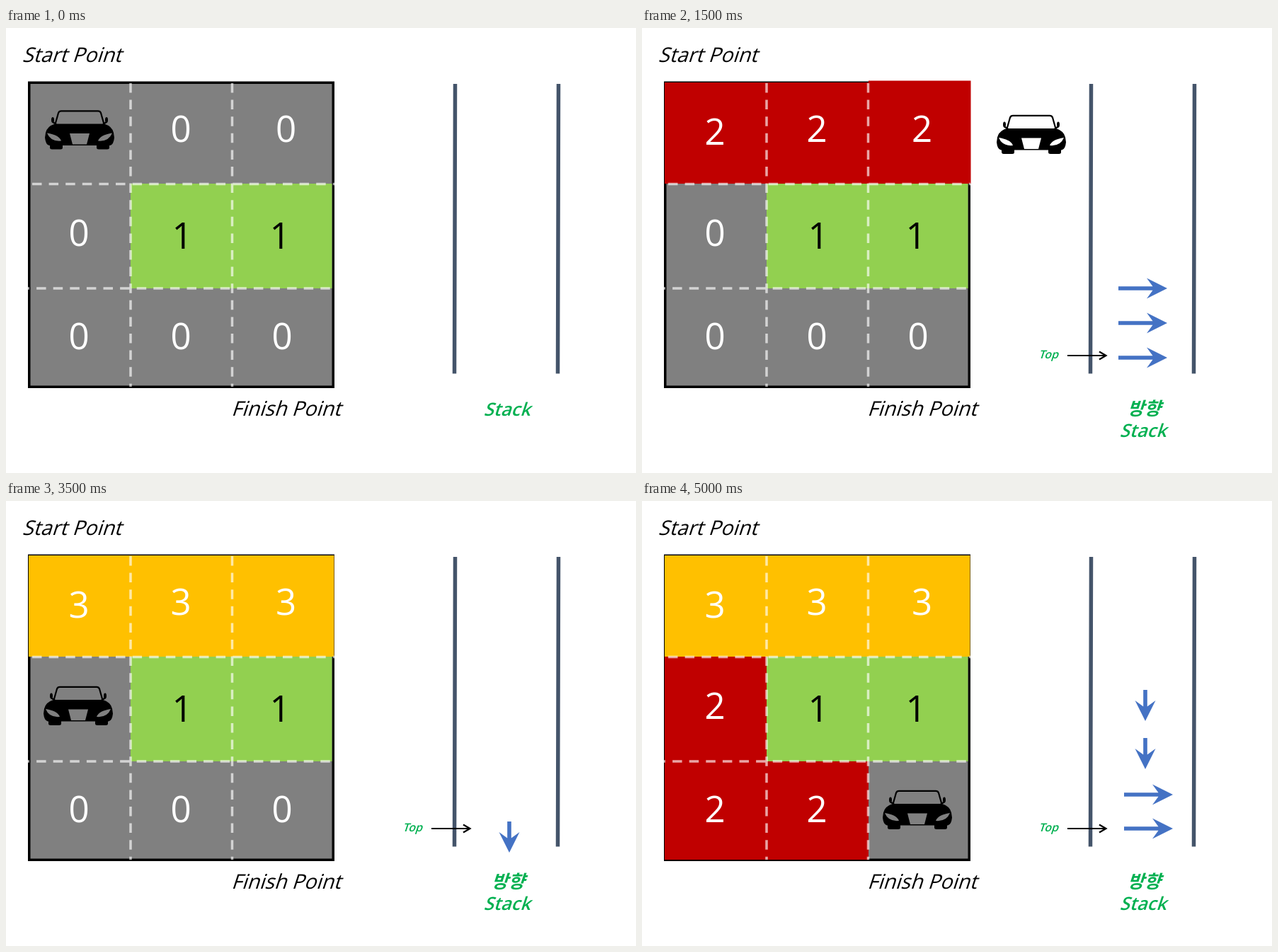
These frames come from a looping animation (890x629 px, 6.5 s). An HTML page:

```html
<!DOCTYPE html>
<html lang="en">
<head>
<meta charset="utf-8">
<title>Maze search with a direction stack</title>
<style>
  html, body { margin: 0; width: 100%; height: 100%; overflow: hidden; background: #fff; }
  svg { display: block; }
  text { font-family: "Open Sans", "Noto Sans CJK KR", "Noto Sans CJK", sans-serif; }
  .digit { font-size: 51px; font-weight: 500; text-anchor: middle; fill: #fff; }
  .wall { font-weight: 400; fill: #000; }
  .label { font-size: 28.6px; }
  .green { font-size: 25.5px; font-weight: 600; fill: #00b050; }
  .small { font-size: 16px; }
  .dash { stroke: #fff; stroke-opacity: .65; stroke-width: 3.5; stroke-dasharray: 13.5 10.1; }
  .thin { fill: none; stroke: #000; stroke-width: 2.2; }
</style>
</head>
<body>
<svg width="890" height="629" viewBox="0 0 890 629">
  <defs>
    <g id="car">
      <path fill-rule="evenodd" d="M69 135.500H139Q150 139 152 148L153 155Q152 165 147 166H61Q56 165 55 155L56 148Q58 139 69 135.500Z
        M90 149H118L114 164.500H94ZM58 148.500Q75 151 78 159.500Q63 161 58 148.500ZM150 148.500Q133 151 130 159.500Q145 161 150 148.500Z"/>
      <path d="M62 163H80V169Q80 171.500 77 171.500H65Q62 171.500 62 169ZM128 163H146V169Q146 171.500 143 171.500H131Q128 171.500 128 169Z"/>
      <path fill="none" stroke="#000" stroke-width="2.200" d="M69.500 136L74 120Q75 117.300 78 117.300H130Q133 117.300 134 120L138.500 136M66 133L71 136M142 133L137 136"/>
      <ellipse cx="66" cy="130" rx="2" ry="4"/>
      <ellipse cx="142" cy="130" rx="2" ry="4"/>
    </g>
  </defs>
  <rect width="890" height="629" fill="#fff"/>
  <rect x="32.750" y="77.250" width="429.500" height="430" fill="#808080" stroke="#000" stroke-width="3.500"/>
  <g id="cells"></g>
  <path class="dash" d="M176 78V507M319.500 78V507M37 220.500H464"/>
  <path class="dash" d="M31 368H464" stroke-dashoffset="11.500"/>
  <g id="digits"></g>
  <path stroke="#44546a" stroke-width="5.500" d="M634.500 79L633.500 488.500M780.500 79L779.500 488.500"/>
  <g id="labels"></g>
  <g id="stack"></g>
  <use id="driver" href="#car"/>
</svg>
<script>
const STEP = 500, LOOP = 6500;
const colX = [32, 176, 320, 463.5], rowY = [77, 220, 368, 507];
const fills = { 1: '#92d050', 2: '#c00000', 3: '#ffc000' };
const digitX = [103, 247, 395.5, 103, 249, 387, 103, 247, 390];
const digitY = [164.5, 161, 161, 308, 311.5, 311.5, 454, 454, 454];

const right = (x, y) => ({ x, y, angle: 0, length: 69 });
const down = y => ({ x: 711, y, angle: 90, length: 44 });
const pushed = [466, 417, 368].map(y => right(742, y));

// cells: the number shown in each square, "." where the car hides it
const steps = [
  { cells: '.00011000', car: [0, 0], stack: [] },
  { cells: '2.0011000', car: [142, 0], stack: pushed.slice(0, 1) },
  { cells: '22.011000', car: [288, 0], stack: pushed.slice(0, 2) },
  { cells: '222011000', car: [446, 6.5], stack: pushed },
  { cells: '223011000', car: [288, 0], stack: pushed.slice(0, 2), popped: true },
  { cells: '233011000', car: [142, -.5], stack: pushed.slice(0, 1), popped: true },
  { cells: '333011000', car: [0, 0], stack: [], popped: true },
  { cells: '333.11000', car: [-2, 145.5], stack: [down(497)] },
  { cells: '333211.00', car: [0, 291], stack: [down(430), down(497)] },
  { cells: '3332112.0', car: [151, 291], stack: [down(362.5), down(430), right(750, 466)] },
  { cells: '33321122.', car: [285, 292.5], stack: [down(311), down(379), right(750, 415), right(750, 463)] }
];

const byId = id => document.getElementById(id);
const slanted = (x, y, cls, text) =>
  `<text class="${cls}" transform="translate(${x} ${y}) skewX(-18)">${text}</text>`;

// The tip of the arrow is at (x, y).
const arrow = ({ x, y, angle, length }) =>
  `<path fill="#4472c4" transform="translate(${x} ${y}) rotate(${angle})"
    d="M0 0L-29 14.500L-20.500 2.800H${-length}V-2.800H-20.500L-29 -14.500Z"/>`;

function cell(value, i) {
  if (!fills[value]) return '';
  const col = i % 3, row = (i - col) / 3;
  const raised = i === 2 && value === '2';
  const x = colX[col], y = raised ? 74.5 : rowY[row];
  const end = raised ? 464.5 : value === '1' && col === 2 ? 460.5 : colX[col + 1];
  return `<rect x="${x}" y="${y}" width="${end - x}" height="${rowY[row + 1] - y}" fill="${fills[value]}"/>`;
}

const digit = (value, i) => value === '.' ? '' :
  `<text class="digit${value === '1' ? ' wall' : ''}" x="${digitX[i]}" y="${digitY[i]}">${value}</text>`;

const poppedArrow = arrow({ x: 797, y: 502, angle: 180, length: 70 }) +
  `<path class="thin" style="stroke-width:3.5" d="M739 490C752 530 800 544 831 519.500M817 519L832 519L826.500 532"/>`;

const pointer = '<path class="thin" d="M601 463H655M646 457.500L655.500 463L646 468.500"/>';

function show(index) {
  const { cells, car, stack, popped } = steps[index];
  const values = [...cells];
  byId('cells').innerHTML = values.map(cell).join('');
  byId('digits').innerHTML = values.map(digit).join('');
  byId('stack').innerHTML = stack.map(arrow).join('') + (popped ? poppedArrow : '');
  byId('labels').innerHTML =
    slanted(22.5, 47.5, 'label', 'Start Point') +
    slanted(318, 548, 'label', 'Finish Point') +
    slanted(674.5, index ? 577.5 : 547.5, 'green', 'Stack') +
    (index ? slanted(685.5, 547, 'green', '방향') + slanted(560, 466.5, 'green small', 'Top') + pointer : '');
  byId('driver').setAttribute('transform', `translate(${car})`);
}

let shown = -1;
function tick() {
  const index = Math.min(steps.length - 1, Math.floor(performance.now() % LOOP / STEP));
  if (index !== shown) show(shown = index);
  requestAnimationFrame(tick);
}
tick();
</script>
</body>
</html>
```
